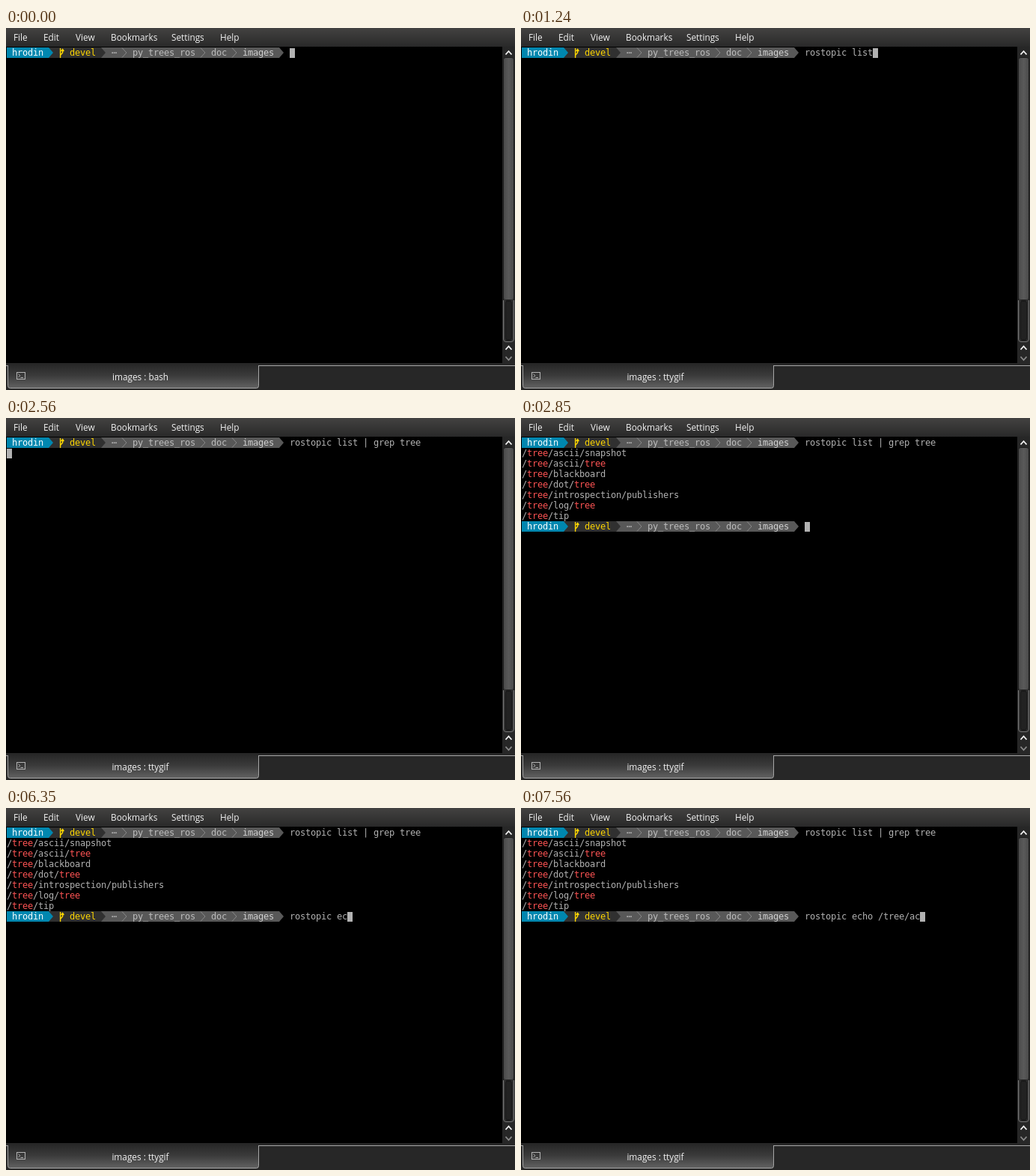
These frames come from a looping animation (680 by 484 pixels, 8 s). An HTML page:

```html
<!DOCTYPE html>
<html lang="en">
<head>
<meta charset="utf-8">
<title>Terminal</title>
<style>
  html, body { margin: 0; width: 100%; height: 100%; overflow: hidden; background: #000; }
  svg { display: block; }
  text { white-space: pre; }
  .ui { font: 11.8px "Open Sans", "Noto Sans", sans-serif; fill: #f2f2f2; }
  .term {
    font: 12px "DejaVu Sans Mono", monospace;
    letter-spacing: calc(7px - 0.60205em); /* 7px cells */
    fill: #b2b2b2;
  }
  .hit { fill: #ff5454; }
  .line { fill: none; }
</style>
</head>
<body>
<svg width="680" height="484" viewBox="0 0 680 484">
  <defs>
    <linearGradient id="menuBg" x2="0" y2="1">
      <stop offset="0" stop-color="#434241"/>
      <stop offset="1" stop-color="#292929"/>
    </linearGradient>
    <linearGradient id="tabBg" x2="0" y2="1">
      <stop offset="0" stop-color="#292929"/>
      <stop offset=".45" stop-color="#3b3b3b"/>
      <stop offset="1" stop-color="#626262"/>
    </linearGradient>
    <linearGradient id="thumbBg">
      <stop offset="0" stop-color="#4b4b4b"/>
      <stop offset=".5" stop-color="#5a5a5a"/>
      <stop offset="1" stop-color="#4b4b4b"/>
    </linearGradient>
    <linearGradient id="grooveBg">
      <stop offset="0" stop-color="#3a3a3a"/>
      <stop offset=".35" stop-color="#202020"/>
      <stop offset=".65" stop-color="#202020"/>
      <stop offset="1" stop-color="#3a3a3a"/>
    </linearGradient>
    <g id="prompt" class="term">
      <path fill="#585858" d="M127 0H365L371 7L365 14H127Z"/>
      <path fill="#303030" d="M57 0H127L133 7L127 14H57Z"/>
      <path fill="#0087af" d="M1 0H57L63 7L57 14H1Z"/>
      <path class="line" stroke="#8a8a8a" d="M155 0.5L161 7L155 13.5M260 0.5L266 7L260 13.5M302 0.5L308 7L302 13.5"/>
      <path class="line" stroke="#ffd700" stroke-width="1.4" d="M72.6 1V14M72.6 10.5L75.6 7V3M73.8 5L75.6 2.5L77.4 5"/>
      <text x="8" y="11" fill="#fff">hrodin</text>
      <text x="85" y="11" fill="#ffd700">devel</text>
      <text x="141" y="11" fill="#bcbcbc">⋯</text>
      <text x="169" y="11" fill="#bcbcbc">py_trees_ros</text>
      <text x="274" y="11" fill="#bcbcbc">doc</text>
      <text x="316" y="11" fill="#d0d0d0">images</text>
    </g>
  </defs>

  <rect width="680" height="484" fill="#272727"/>
  <rect width="680" height="25" fill="url(#menuBg)"/>
  <g class="ui">
    <text x="10" y="17">File</text>
    <text x="50" y="17">Edit</text>
    <text x="93" y="17">View</text>
    <text x="140" y="17">Bookmarks</text>
    <text x="221" y="17">Settings</text>
    <text x="286" y="17">Help</text>
  </g>

  <rect y="25" width="663" height="423" fill="#000"/>
  <use href="#prompt" y="26"/>
  <g id="output" class="term"></g>
  <use id="prompt2" href="#prompt" y="138"/>
  <g class="term">
    <text id="cmd1" x="379" y="37"></text>
    <text id="cmd2" x="379" y="149"></text>
  </g>
  <rect id="cursor" width="7" height="13" fill="#b2b2b2"/>

  <rect x="664.5" y="39.5" width="14" height="380" rx="3" fill="url(#grooveBg)" stroke="#1c1c1c"/>
  <path class="line" stroke="#777" d="M664.5 364V416Q664.5 419.5 668 419.5H675Q678.5 419.5 678.5 416V364"/>
  <rect x="667.5" y="365.5" width="8" height="51" rx="2" fill="#222" stroke="#161616"/>
  <rect x="665" y="40" width="13" height="323" rx="3" fill="url(#thumbBg)"/>
  <g class="line" stroke="#f4f4f4" stroke-width="1.8">
    <path d="M667.5 35.5L671.5 31L675.5 35.5"/>
    <path d="M667.5 430L671.5 425.5L675.5 430"/>
    <path stroke="#8c8c8c" d="M667.5 439.5L671.5 444L675.5 439.5"/>
  </g>

  <path class="line" stroke="#a6a6a6" d="M0 451.5H2.5M337.5 451.5H680"/>
  <path fill="url(#tabBg)" stroke="#a6a6a6" d="M2.5 451V478.5Q2.5 481.5 5.5 481.5H334.5Q337.5 481.5 337.5 478.5V451"/>
  <g class="line" stroke="#b4b4b4">
    <rect x="14.5" y="460.5" width="11" height="9"/>
    <path d="M16.5 462.5L18.8 464.8L16.5 467.1M19.5 467.5H23"/>
  </g>
  <text id="tab" class="ui" x="179.5" y="471" text-anchor="middle"></text>
</svg>

<script>
  const LOOP = 8000, CELL = 7, ROW = 14, TOP = 26, INPUT_COL = 54;
  const ENTER = 2560, OUTPUT = 2760, PROMPT = 2850, RENAME = 430;
  const $ = id => document.getElementById(id);

  // Each burst is [key count, first key ms, last key ms].
  const keyTimes = bursts => bursts.flatMap(([n, from, to]) =>
    Array.from({ length: n }, (_, i) => n > 1 ? from + (to - from) * i / (n - 1) : from));

  const first = {
    el: $("cmd1"), row: 0, text: "rostopic list | grep tree",
    keys: keyTimes([[12, 430, 1220], [2, 1240, 1360], [3, 1520, 1700], [2, 1870, 1920],
      [2, 1970, 2050], [1, 2110], [2, 2300, 2340], [1, 2490]])
  };
  const second = {
    el: $("cmd2"), row: 8, text: "rostopic echo /tree/ac",
    keys: keyTimes([[1, 5290], [7, 5410, 5840], [3, 6200, 6350], [3, 6470, 6590],
      [2, 6810, 6900], [2, 7070, 7120], [4, 7280, 7560]])
  };

  const topics = ["ascii/snapshot", "ascii/tree", "blackboard", "dot/tree",
    "introspection/publishers", "log/tree", "tip"];
  $("output").innerHTML = topics.map((topic, i) => {
    const line = `/tree/${topic}`.replace(/tree/g, '<tspan class="hit">tree</tspan>');
    return `<text x="1" y="${TOP + ROW * (i + 1) + 11}">${line}</text>`;
  }).join("");

  const show = (el, on) => el.setAttribute("visibility", on ? "visible" : "hidden");
  const setText = (el, s) => { if (el.textContent !== s) el.textContent = s; };

  function typeLine({ el, text, keys }, t) {
    const count = keys.filter(k => k <= t).length;
    setText(el, text.slice(0, count));
    return count;
  }

  function cursorCell(t, count1, count2) {
    if (t < ENTER) return [INPUT_COL + count1, first.row];
    if (t < OUTPUT) return [0, 1];
    if (t < PROMPT) return [0, second.row];
    return [INPUT_COL + count2, second.row];
  }

  function draw() {
    const t = performance.now() % LOOP;
    const [col, row] = cursorCell(t, typeLine(first, t), typeLine(second, t));
    $("cursor").setAttribute("x", 1 + col * CELL);
    $("cursor").setAttribute("y", TOP + 1 + row * ROW);
    show($("output"), t >= OUTPUT);
    show($("prompt2"), t >= PROMPT);
    setText($("tab"), t < RENAME ? "images : bash" : "images : ttygif");
    requestAnimationFrame(draw);
  }
  draw();
</script>
</body>
</html>
```
